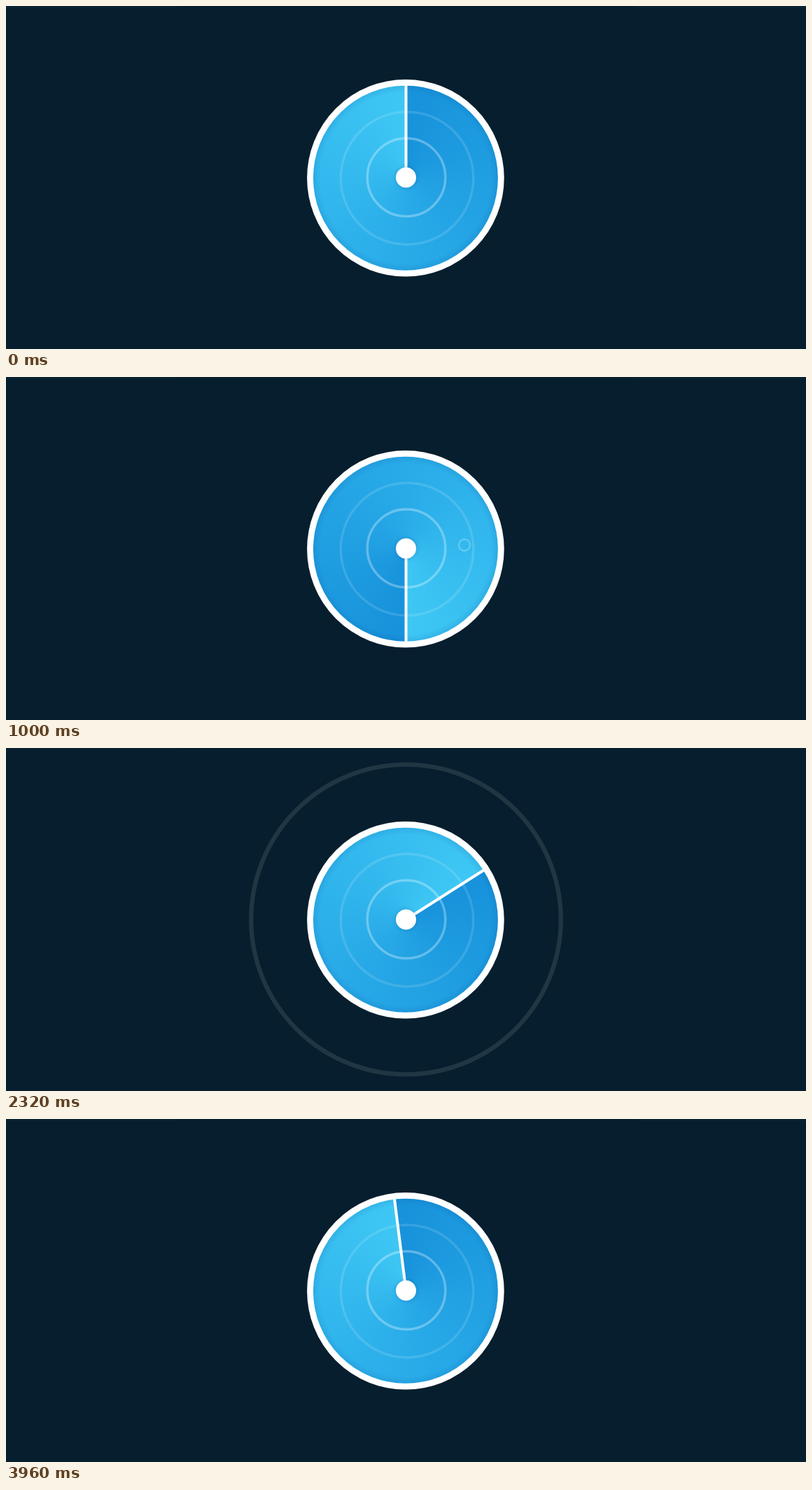
Write an HTML page with a canvas that moves like this. It is 1143x490 px and loops after 4 s.

```html
<!DOCTYPE html>
<html>
<head>
<meta charset="utf-8">
<title>Radar</title>
<style>
  html, body { margin: 0; width: 100%; height: 100%; overflow: hidden; background: #061e2d; }
  canvas { display: block; }
</style>
</head>
<body>
<canvas id="stage" width="1143" height="490"></canvas>
<script>
const ctx = document.getElementById('stage').getContext('2d');
const LOOP = 4000, TURN = 2000, STEP = 40;
const CX = 571.5, CY = 245;
const DISC = { x: 570.9, y: 245.75, inner: 132, outer: 140.8 };
const PULSES = [0, 1960];
const BLIPS = [
  { x: 655, y: 240, start: 481 },
  { x: 501.5, y: 232, start: 1558 },
  { x: 597.5, y: 343.3, start: 2917 }
];

const white = alpha => `rgba(255,255,255,${alpha})`;

function disc(x, y, r, fill) {
  ctx.beginPath();
  ctx.arc(x, y, r, 0, 2 * Math.PI);
  ctx.fillStyle = fill;
  ctx.fill();
}

// r is the outer edge of the stroke
function ring(x, y, r, width, color) {
  ctx.beginPath();
  ctx.arc(x, y, r - width / 2, 0, 2 * Math.PI);
  ctx.lineWidth = width;
  ctx.strokeStyle = color;
  ctx.stroke();
}

function pulse(age) {
  if (age < 0 || age > 1100) return;
  const r = 338 - 202 * Math.exp(-0.0016 * age);
  const alpha = 0.2 * (298 - r) / 138;
  if (alpha > 0) ring(CX, CY, r, r * 0.028, white(alpha));
}

function blip({ x, y, start }, t) {
  const age = t - start;
  if (age < 0 || age > 700) return;
  ring(x, y, 0.6 + age * 0.0165, 0.9 + age * 0.0023, white(1 - age / 700));
}

function sweep(angle) {
  const fill = ctx.createConicGradient(angle - Math.PI / 2, CX, CY);
  fill.addColorStop(0, '#1792db');
  fill.addColorStop(0.5, '#29abe8');
  fill.addColorStop(1, '#3ec7f4');
  disc(DISC.x, DISC.y, DISC.inner + 1, fill);

  const shade = ctx.createRadialGradient(DISC.x, DISC.y, 122, DISC.x, DISC.y, DISC.inner);
  shade.addColorStop(0, 'rgba(0,70,150,0)');
  shade.addColorStop(1, 'rgba(0,70,150,0.13)');
  disc(DISC.x, DISC.y, DISC.inner, shade);
}

function hand(angle) {
  ctx.save();
  ctx.translate(CX, CY);
  ctx.rotate(angle);
  ctx.fillStyle = '#fff';
  ctx.fillRect(-2, -133, 4, 133);
  ctx.restore();
}

function draw(t) {
  const angle = t / TURN * 2 * Math.PI;
  ctx.fillStyle = '#061e2d';
  ctx.fillRect(0, 0, 1143, 490);
  ctx.fillStyle = '#092231';
  ctx.fillRect(0, 0, 245, 3);
  ctx.fillRect(899, 0, 244, 3);

  PULSES.forEach(start => pulse(t - start));
  sweep(angle);
  ring(573, 246, 96.5, 3.5, white(0.13));
  ring(572, 244.8, 57.5, 3.5, white(0.3));
  BLIPS.forEach(b => blip(b, t));
  hand(angle);
  ring(DISC.x, DISC.y, DISC.outer, DISC.outer - DISC.inner, '#fff');

  ctx.save();
  ctx.shadowColor = 'rgba(0,60,130,0.3)';
  ctx.shadowBlur = 6;
  disc(CX, CY, 14.5, '#fff');
  ctx.restore();
}

function frame() {
  const t = performance.now() % LOOP;
  draw(Math.floor(t / STEP) * STEP);
  requestAnimationFrame(frame);
}
frame();
</script>
</body>
</html>
```
